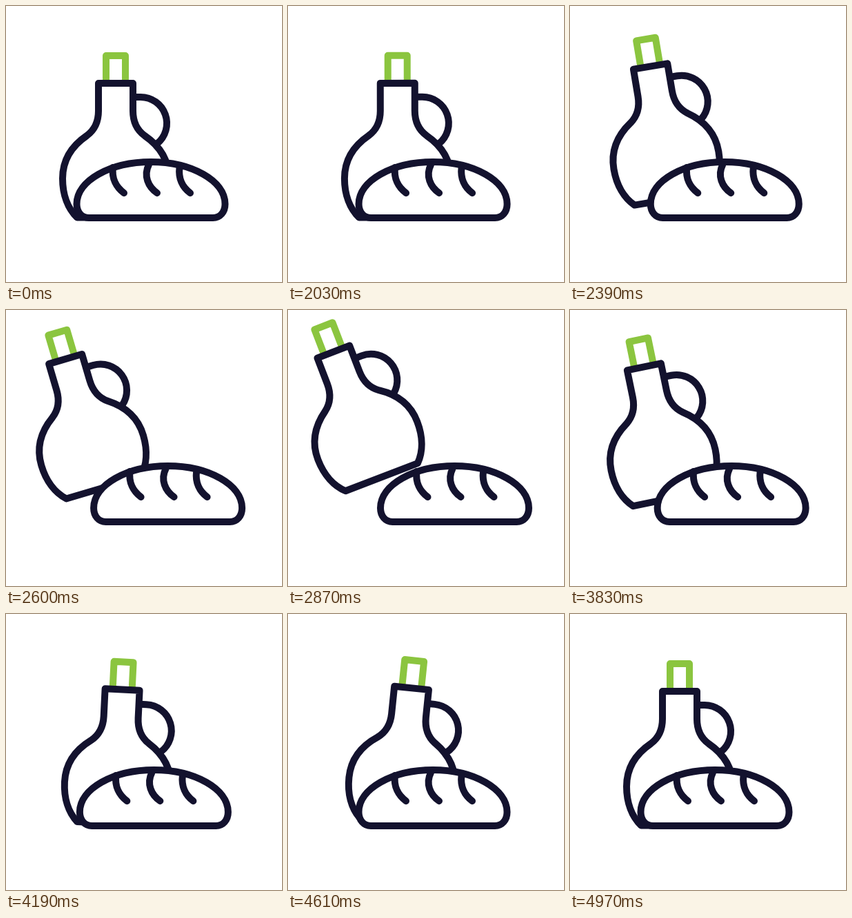
These frames come from a looping animation (400 by 400 pixels, 5.03 s). An HTML page with a canvas:

```html
<!DOCTYPE html>
<html lang="en">
<head>
<meta charset="utf-8">
<title>Oil and bread</title>
<style>
html, body { margin: 0; width: 100%; height: 100%; overflow: hidden; background: #fff; }
canvas { display: block; width: 400px; height: 400px; }
</style>
</head>
<body>
<canvas id="stage" width="400" height="400"></canvas>
<script>
const ctx = document.getElementById('stage').getContext('2d');
const LOOP = 5030, STEP = 30;
const START = 2000, PEAK = 3150, LAND = 4070, BREAD_END = 4475, END = 4970;
const INK = '#13122e', GREEN = '#8bc53f';

const shape = {
  cap: new Path2D('M145 110V72H173V110'),
  handle: new Path2D('M186 132H195A38 38 0 0 1 219 199.5'),
  bottle: new Path2D('M134 112V152C134 167 128 180 117 188C95 203 82 224 82 250' +
    'C82 274 90 294 103 306.5H215C228 294 236 274 236 250' +
    'C236 224 223 203 201 188C190 180 184 167 184 152V112Z'),
  bread: new Path2D('M120 307H300C310 307 317.5 299 317.5 287' +
    'C317.5 253.3 269.4 226 210 226C150.6 226 102.5 253.3 102.5 287' +
    'C102.5 299 110 307 120 307Z'),
  cuts: new Path2D('M155 234C153 250 160 263 171 271M207 230C199 246 206 262 219 271' +
    'M251.5 234C249.5 250 256 263 267 271')
};

// Cubic Bezier easing from (0,0) to (1,1), solved by bisection
function bezier(x1, y1, x2, y2) {
  const at = (u, a, b) => 3 * u * (1 - u) * (1 - u) * a + 3 * u * u * (1 - u) * b + u * u * u;
  return x => {
    if (x <= 0) return 0;
    if (x >= 1) return 1;
    let lo = 0, hi = 1;
    for (let i = 0; i < 30; i++) {
      const mid = (lo + hi) / 2;
      if (at(mid, x1, x2) < x) lo = mid; else hi = mid;
    }
    return at(lo, y1, y2);
  };
}

const rise = bezier(0.31, 0, 0.36, 1);
const fall = bezier(0.823, 0, 0.7, 0.7);
const slide = bezier(0.76, 0, 0.57, 1);
const span = (t, a, b) => Math.min(1, Math.max(0, (t - a) / (b - a)));

function rotateAt(x, y, deg) {
  ctx.translate(x, y);
  ctx.rotate(deg * Math.PI / 180);
  ctx.translate(-x, -y);
}

function line(path, color, fill) {
  if (fill) {
    ctx.fillStyle = '#fff';
    ctx.fill(path);
  }
  ctx.strokeStyle = color;
  ctx.stroke(path);
}

function drawBottle(t) {
  const lift = rise(span(t, START, PEAK)) - fall(span(t, PEAK, LAND));
  const k = span(t, LAND, END);
  const tip = 4 * k * (1 - k) * 6.1;
  ctx.save();
  rotateAt(215, 306, tip);   // rocks on its right corner after landing
  ctx.translate(-70.2 * lift, -59.6 * lift);
  rotateAt(158.5, 187, -22.3 * lift);
  line(shape.cap, GREEN);
  line(shape.handle, INK);
  line(shape.bottle, INK, true);
  ctx.restore();
}

function drawBread(t) {
  const shift = rise(span(t, START, PEAK)) - slide(span(t, PEAK, BREAD_END));
  ctx.save();
  ctx.translate(33.4 * shift, 0);
  line(shape.bread, INK, true);
  line(shape.cuts, INK);
  ctx.restore();
}

function draw(now) {
  const time = now % LOOP;
  const t = START + Math.floor((time - START) / STEP) * STEP;
  ctx.fillStyle = '#fff';
  ctx.fillRect(0, 0, 400, 400);
  ctx.lineWidth = 10;
  ctx.lineCap = ctx.lineJoin = 'round';
  drawBottle(t);
  drawBread(t);
}

const origin = performance.now();
function tick() {
  draw(performance.now() - origin);
  requestAnimationFrame(tick);
}
tick();
</script>
</body>
</html>
```
